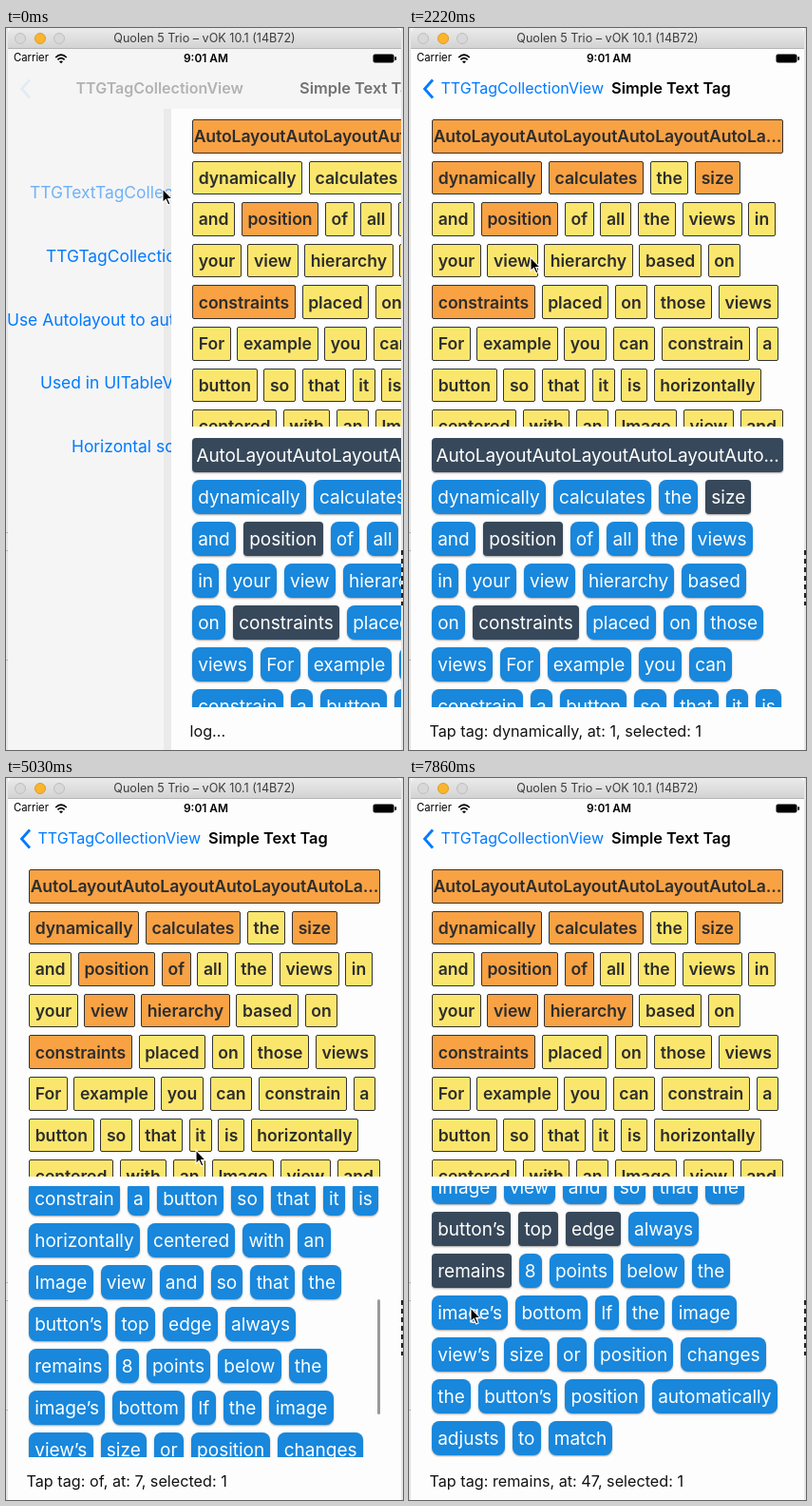
Animation of 418 by 759 pixels, one loop 8000 ms. Source, as an HTML page:

```html
<!DOCTYPE html>
<html lang="en">
<head>
<meta charset="utf-8">
<style>
  html, body { margin: 0; width: 100%; height: 100%; overflow: hidden; }
  body { font-family: Inter, sans-serif; font-optical-sizing: none; white-space: pre; }
  div, svg { position: absolute; }
  #stage { left: 0; top: 0; width: 418px; height: 759px; overflow: hidden; background: #e6e6e6; }
  #marks { left: 416px; top: 549px; width: 2px; height: 58px; background: repeating-linear-gradient(#222 0 5px, #e6e6e6 5px 9px); }
  .edge { left: 0; width: 2px; height: 1px; background: #b5b5b5; }
  #screen { inset: 0; clip-path: inset(0 2px); background: #fdfdfd; }
  #list { inset: 85px 0 0; background: #f5f5f5; color: #007aff; font-size: 17.4px; }
  #page { left: 2px; top: 0; width: 414px; height: 759px; background: #fdfdfd; box-shadow: -8px 0 0 #0000000b; }
  #bar { left: 0; top: 22px; width: 418px; height: 63px; font-size: 16px; }
  #chrome { left: 2px; top: 0; width: 414px; height: 22px; background: linear-gradient(#ebebeb, #d3d3d3);
    border-bottom: 1px solid #b4b4b4; box-sizing: border-box; border-radius: 5px 5px 0 0; }
  .light { top: 5px; width: 10px; height: 10px; border: 1px solid #bebebe; border-radius: 50%; background: #d8d8d8; }
  .line { transform: translateY(-50%); line-height: 1.2; }
  .bold { font-weight: 600; }
  .blue { color: #007aff; }
  .tags { left: 18px; width: 378px; overflow: hidden; }
  .row { left: 4px; display: flex; }
  .tag { position: static; flex: none; box-sizing: border-box; display: flex; align-items: center; justify-content: center; }
  #top { top: 96px; height: 323px; }
  #top .row { gap: 6.6px; height: 35.5px; }
  #top .tag { padding: 0 5.65px; border: 1px solid #333; border-radius: 2px; background: #fbe66d;
    color: #2d2d2d; font-size: 17.6px; font-weight: 600; }
  #top .on { background: #f8a244; }
  #bottom { top: 429px; height: 285px; }
  #bottom .row { gap: 8px; height: 36px; }
  #bottom .tag { padding: 0 6.2px; border-radius: 8px; background: #1887dc; color: #fff; font-size: 19.05px;
    box-shadow: 0 1px 2px #00000059; }
  #bottom .on { background: #37485a; border-radius: 4px; }
  .tags .row .wide { width: 370px; padding: 0; letter-spacing: -.1px; }
  #thumb { left: 389px; width: 2.5px; height: 121px; border-radius: 2px; background: #9a9a9a; }
  #log { left: 19.5px; top: 740px; font-size: 16.2px; color: #111; }
</style>
</head>
<body>
<div id="stage">
  <div class="edge" style="top:530px"></div>
  <div class="edge" style="top:549px"></div>
  <div class="edge" style="top:664px"></div>
  <div id="marks"></div>
  <div id="screen">
    <div id="list"></div>
    <div id="page">
      <div id="top" class="tags"></div>
      <div id="bottom" class="tags"><div id="content"></div></div>
      <div id="thumb"></div>
      <div id="log" class="line"></div>
    </div>
    <div id="bar">
      <svg id="chevron" style="left:14px;top:31px" width="13" height="22" fill="none" stroke="#007aff" stroke-width="2.8"><path d="M11 1.5 2.5 11 11 20.5"/></svg>
      <div id="back" class="line blue" style="top:42px">TTGTagCollectionView</div>
      <div id="oldTitle" class="line bold" style="top:42px">TTGTagCollectionView</div>
      <div id="newTitle" class="line bold" style="top:42px;font-size:16.4px">Simple Text Tag</div>
      <div class="line" style="left:8px;top:10px;font-size:11.3px">Carrier</div>
      <svg style="left:51px;top:4px" width="14" height="12" fill="none" stroke="#000" stroke-width="1.7">
        <path d="M1.2 5Q7 -.6 12.8 5M3.4 7.4Q7 4 10.6 7.4"/><path d="M5 9.2Q7 7.6 9 9.2L7 11.2Z" fill="#000" stroke="none"/>
      </svg>
      <div class="line bold" style="left:187px;top:10px;font-size:11.9px">9:01 AM</div>
      <svg style="left:386px;top:5px" width="26" height="11"><rect x=".5" y=".5" width="22" height="9" rx="2"/><rect x="23.3" y="3" width="1.7" height="4" rx="1"/></svg>
    </div>
    <div id="chrome">
      <div class="light" style="left:7px"></div>
      <div class="light" style="left:28px;background:#fbb52c;border-color:#dc9b2a"></div>
      <div class="light" style="left:48px"></div>
      <div class="line" style="left:207px;top:11px;transform:translate(-50%,-50%);font-size:12.6px;color:#3d3d3d">Quolen 5 Trio – vOK 10.1 (14B72)</div>
    </div>
    <svg id="cursor" style="left:-2px;top:-2px" width="16" height="22"><path d="M2 2V16.5L5.3 13.4 7.8 19 10 18 7.6 12.6H12.2Z" stroke="#fff" stroke-width="1.1"/></svg>
  </div>
</div>
<script>
const LOOP = 8000, STEP = 148;
const $ = id => document.getElementById(id);
const words = ('dynamically calculates the size and position of all the views in your view hierarchy based on ' +
  'constraints placed on those views For example you can constrain a button so that it is horizontally ' +
  'centered with an Image view and so that the button’s top edge always remains 8 points below the ' +
  'image’s bottom If the image view’s size or position changes the button’s position automatically ' +
  'adjusts to match').split(' ');
const preselected = [0, 4, 6, 17];

const taps = [
  { at: 5, tag: 2 }, { at: 11, tag: 1 }, { at: 17, tag: 13 }, { at: 20, tag: 14 }, { at: 23, tag: 7 },
  { at: 39, tag: 45, low: true }, { at: 43, tag: 44, low: true }, { at: 47, tag: 43, low: true }, { at: 52, tag: 47, low: true }
];
const cursorPath = [
  [0, 165, 169], [2, 164, 173], [6, 165, 168], [8, 118, 168], [9, 102, 166], [12, 102, 166], [15, 128, 241],
  [17, 128, 241], [19, 184, 243], [20, 184, 243], [23, 180, 212], [25, 182, 214], [30, 196, 502], [31, 198, 662],
  [32, 198, 600], [33, 199, 500], [34, 200, 391], [35, 204, 318], [36, 204, 325], [38, 190, 474], [40, 188, 474],
  [42, 113, 478], [43, 120, 478], [45, 62, 477], [48, 63, 480], [50, 65, 519], [52, 65, 520], [53, 65, 557]
];
const scrollPath = [[31, 0], [32, 62], [33, 162], [34, 271], [35, 344], [36, 371]];

function add(parent, className, text = '', style = {}) {
  const node = document.createElement('div');
  node.className = className;
  node.textContent = text;
  Object.assign(node.style, style);
  return parent.appendChild(node);
}

function buildTags(parent, firstLabel, rowSizes, pitch, top) {
  const labels = [firstLabel, ...words], tags = [];
  rowSizes.forEach((size, i) => {
    const row = add(parent, 'row', '', { top: top + i * pitch + 'px' });
    while (size--) tags.push(add(row, tags.length ? 'tag' : 'tag wide', labels[tags.length]));
  });
  return tags;
}

function along(path, time) {
  const next = path.findIndex(key => key[0] > time);
  if (next === 0) return path[0].slice(1);
  if (next < 0) return path[path.length - 1].slice(1);
  const a = path[next - 1], b = path[next], f = (time - a[0]) / (b[0] - a[0]);
  return a.slice(1).map((v, i) => v + (b[i + 1] - v) * f);
}

const upper = buildTags($('top'), 'AutoLayoutAutoLayoutAutoLayoutAutoLa...', [1, 4, 7, 5, 5, 6, 6, 6], 43.6, 0);
const lower = buildTags($('content'), 'AutoLayoutAutoLayoutAutoLayoutAuto...',
  [1, 4, 6, 5, 5, 5, 7, 4, 6, 4, 5, 5, 5, 4, 3], 44, 2);
const menu = [['TTGTextTagCollectionView', 25], ['TTGTagCollectionView', 42], ['Use Autolayout to auto adjust', 1],
  ['Used in UITableViewCell', 36], ['Horizontal scroll', 69]].map(([label, x], i) =>
  add($('list'), 'line', label, { left: x + 'px', top: 88 + i * 66.8 + 'px', opacity: i ? 1 : .55 }));

function render(step) {
  // Push transition
  let offset = 172 * Math.exp(-1.88 * step);
  if (offset < .5) offset = 0;
  const p = offset / 172, shade = 253 - 8 * p;
  $('page').style.transform = `translateX(${offset}px)`;
  menu.forEach(item => item.style.marginLeft = (offset - 172) * .3 + 'px');
  $('bar').style.background = `rgb(${shade}, ${shade}, ${shade})`;
  $('back').style.left = $('oldTitle').style.left = 33.5 + 40 * p + 'px';
  $('newTitle').style.left = 213 + 96 * p + 'px';
  $('back').style.opacity = 1 - p;
  $('oldTitle').style.opacity = p * .27;
  $('newTitle').style.opacity = 1 - p * .47;
  $('chevron').style.opacity = 1 - p * .93;

  // Selection and log line
  const done = taps.filter(tap => tap.at <= step);
  [upper, lower].forEach((tags, low) => tags.forEach((tag, i) => tag.classList.toggle('on',
    preselected.includes(i) || done.some(tap => tap.tag === i && !!tap.low === !!low))));
  const last = done[done.length - 1];
  $('log').textContent = last ? `Tap tag: ${words[last.tag - 1]}, at: ${last.tag}, selected: 1` : 'log...';

  // Scrolling and pointer
  const [scroll] = along(scrollPath, step);
  $('content').style.transform = `translateY(${-scroll}px)`;
  $('thumb').style.top = 430 + scroll * .435 + 'px';
  $('thumb').style.opacity = step > 31 && step < 41 ? 1 : 0;
  const [x, y] = along(cursorPath, step);
  $('cursor').style.transform = `translate(${x}px, ${y}px)`;
}

function tick() {
  render(Math.min(53, Math.floor((performance.now() % LOOP + 10) / STEP)));
  requestAnimationFrame(tick);
}
tick();
</script>
</body>
</html>
```
